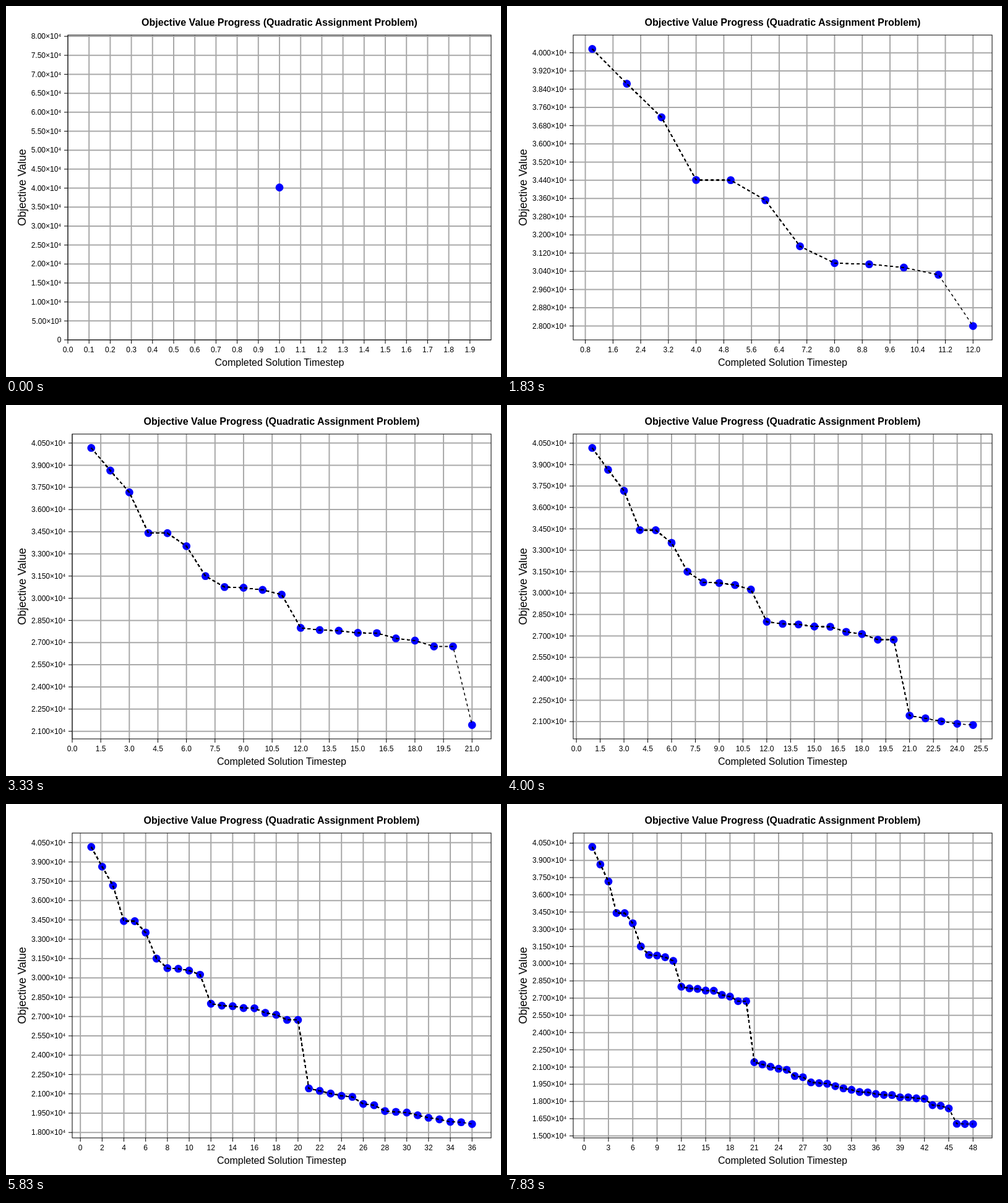
Write an HTML page that moves like this. It is 800x600 px and loops after 8 s.

```html
<!DOCTYPE html>
<html lang="en">
<head>
<meta charset="utf-8">
<title>Objective Value Progress</title>
<style>
  html, body { margin: 0; width: 100%; height: 100%; overflow: hidden; background: #fff; }
  svg { display: block; width: 800px; height: 600px; font-family: "Liberation Sans", Arial, sans-serif; }
  text { text-anchor: middle; }
  .grid { stroke: #a9a9a9; stroke-width: 2; }
  .axis { stroke: #000; stroke-width: 1; fill: none; }
  .tick { font-size: 12px; }
  .left { text-anchor: end; }
  .dash { stroke: #000; stroke-width: 1.5; stroke-dasharray: 4.5 4.5; fill: none; }
</style>
</head>
<body>
<svg id="chart" viewBox="0 0 800 600"></svg>
<script>
const LOOP = 8000;
const TOP = 47, BOTTOM = 540, RIGHT = 784;
const MID_Y = (TOP + BOTTOM) / 2;
const STEPS = [1, 1.5, 2, 2.5, 3, 4, 5, 6, 8, 10];
const VALUES = [
  40170, 38640, 37166, 34413, 34405, 33523, 31501, 30760, 30712, 30567, 30248, 27996,
  27850, 27806, 27660, 27645, 27287, 27136, 26739, 26737, 21423, 21229, 21022, 20847,
  20760, 20217, 20116, 19665, 19600, 19546, 19335, 19143, 19018, 18826, 18797, 18654,
  18570, 18560, 18365, 18360, 18273, 18240, 17681, 17627, 17395, 16055, 16040, 16034
];
const chart = document.getElementById('chart');

// Data limits with a 5% margin; a single value sits in the middle of 0..2v.
function limits(a, b) {
  if (a === b) return [0, 2 * a];
  const pad = (b - a) * 0.05;
  return [a - pad, b + pad];
}

// About 20 evenly spaced ticks at a round step.
function findTicks([lo, hi]) {
  const raw = (hi - lo) / 20;
  const scale = 10 ** Math.floor(Math.log10(raw) + 1e-9);
  const step = scale * STEPS.find(s => s * scale >= raw * (1 - 1e-9));
  const eps = step * 1e-6, ticks = [];
  for (let i = Math.ceil((lo - eps) / step); i * step < hi - eps; i++) ticks.push(i * step);
  return ticks;
}

function decimals(list) {
  let p = 0;
  while (p < 4 && list.some(v => Math.abs(v - Number(v.toFixed(p))) > 1e-7)) p++;
  return p;
}

const exponent = v => Math.floor(Math.log10(v) + 1e-9);
const mantissa = v => v ? v / 10 ** exponent(v) : 0;

// Scientific notation once the ticks span more than 10^4.
function formatTicks(ticks) {
  const sci = ticks[ticks.length - 1] - ticks[0] > 1e4;
  const digits = sci ? decimals(ticks.map(mantissa)) + 1 : decimals(ticks);
  const label = v => {
    if (!sci) return v.toFixed(digits);
    return v ? mantissa(v).toFixed(digits) + '×10' + '⁰¹²³⁴⁵'[exponent(v)] : '0';
  };
  return { sci, digits, labels: ticks.map(label) };
}

const line = (cls, x1, y1, x2, y2) =>
  `<line class="${cls}" x1="${x1}" y1="${y1}" x2="${x2}" y2="${y2}"/>`;
const text = (str, x, y, attrs) => `<text x="${x}" y="${y}" ${attrs}>${str}</text>`;

function draw(n) {
  const xLim = limits(1, n), yLim = limits(VALUES[n - 1], VALUES[0]);
  const xTicks = findTicks(xLim), yTicks = findTicks(yLim);
  const xFormat = formatTicks(xTicks), yFormat = formatTicks(yTicks);
  const left = yFormat.sci ? 86 + 7 * yFormat.digits : 85;
  const midX = (left + RIGHT) / 2;
  const px = v => left + (v - xLim[0]) / (xLim[1] - xLim[0]) * (RIGHT - left);
  const py = v => BOTTOM - (v - yLim[0]) / (yLim[1] - yLim[0]) * (BOTTOM - TOP);
  let grid = '', axis = '', dots = '', lines = '', path = '';

  xTicks.forEach((v, i) => {
    const x = px(v);
    grid += line('grid', x, TOP, x, BOTTOM);
    axis += line('axis', x, BOTTOM, x, BOTTOM + 6) + text(xFormat.labels[i], x, 560, 'class="tick"');
  });
  yTicks.forEach((v, i) => {
    const y = py(v);
    grid += line('grid', left, y, RIGHT, y);
    axis += line('axis', left - 6, y, left, y) + text(yFormat.labels[i], left - 10.5, y + 4.2, 'class="tick left"');
  });
  axis += `<rect class="axis" x="${left}" y="${TOP}" width="${RIGHT - left}" height="${BOTTOM - TOP}"/>`;

  // Every step adds the whole trail again, so older segments look bolder.
  for (let k = 1; k <= n; k++) {
    const x = px(k), y = py(VALUES[k - 1]);
    dots += `<circle cx="${x}" cy="${y}" r="6.4" fill="#00f"/>`;
    path += `${x},${y} `;
    if (k > 1) lines += `<polyline class="dash" points="${path}"/>`;
  }

  chart.innerHTML = grid + dots + lines + axis +
    text('Objective Value Progress (Quadratic Assignment Problem)', midX, 32, 'font-size="16" font-weight="bold"') +
    text('Completed Solution Timestep', midX, 581.5, 'font-size="16"') +
    text('Objective Value', 0, 0, `font-size="18" transform="translate(32 ${MID_Y}) rotate(-90)"`);
}

let shown = 0;
function update(now) {
  const centis = Math.floor(now % LOOP / 10);
  const n = 1 + Math.floor((centis + 0.5) * 3 / 50);
  if (n !== shown) draw(shown = n);
}

const start = performance.now();
function tick() {
  update(performance.now() - start);
  requestAnimationFrame(tick);
}
tick();
</script>
</body>
</html>
```
